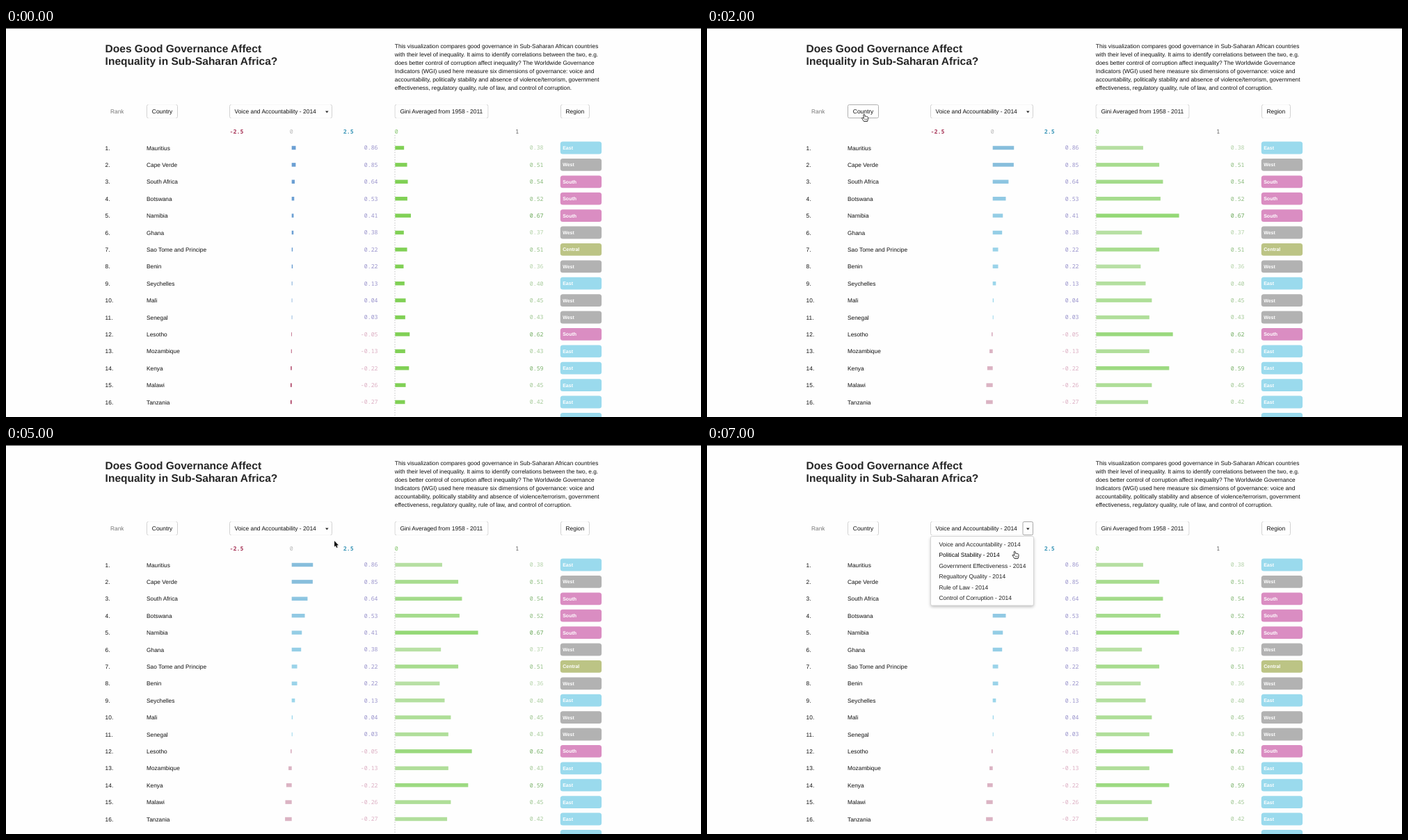
Write an HTML page with a canvas that moves like this. It is 999 px wide and 560 px high and loops after 8 s.

```html
<!DOCTYPE html>
<html lang="en">
<head>
<meta charset="utf-8">
<title>Governance and inequality</title>
<style>
html, body { margin: 0; width: 100%; height: 100%; overflow: hidden; background: #fefefe; }
canvas { display: block; width: 999px; height: 560px; }
</style>
</head>
<body>
<canvas id="stage" width="999" height="560"></canvas>
<script>
const ctx = document.getElementById('stage').getContext('2d');
const SANS = '"Liberation Sans", Arial, sans-serif';
const MONO = '"Noto Sans Mono", "DejaVu Sans Mono", monospace';
const LOOP = 8000, STEP = 1000;
const ROW_TOP = 172.5, ROW_GAP = 24.4, BAR_HEIGHT = 5.5;
const ZERO_X = 410.7, SCORE_SCALE = 35.5, GINI_X = 559.3, GINI_SCALE = 178;

const REGION_COLORS = { East: '#9adaed', West: '#b2b2b2', South: '#da8dc2', Central: '#bcc485' };

const ROWS = [
  ['Mauritius', 0.86, 0.38, 'East'],
  ['Cape Verde', 0.85, 0.51, 'West'],
  ['South Africa', 0.64, 0.54, 'South'],
  ['Botswana', 0.53, 0.52, 'South'],
  ['Namibia', 0.41, 0.67, 'South'],
  ['Ghana', 0.38, 0.37, 'West'],
  ['Sao Tome and Principe', 0.22, 0.51, 'Central'],
  ['Benin', 0.22, 0.36, 'West'],
  ['Seychelles', 0.13, 0.40, 'East'],
  ['Mali', 0.04, 0.45, 'West'],
  ['Senegal', 0.03, 0.43, 'West'],
  ['Lesotho', -0.05, 0.62, 'South'],
  ['Mozambique', -0.13, 0.43, 'East'],
  ['Kenya', -0.22, 0.59, 'East'],
  ['Malawi', -0.26, 0.45, 'East'],
  ['Tanzania', -0.27, 0.42, 'East']
];

const INTRO = [
  'This visualization compares good governance in Sub-Saharan African countries',
  'with their level of inequality. It aims to identify correlations between the two, e.g.',
  'does better control of corruption affect inequality? The Worldwide Governance',
  'Indicators (WGI) used here measure six dimensions of governance: voice and',
  'accountability, politically stability and absence of violence/terrorism, government',
  'effectiveness, regulatory quality, rule of law, and control of corruption.'
];

const MENU = ['Voice and Accountability', 'Political Stability', 'Government Effectiveness',
  'Regualtory Quality', 'Rule of Law', 'Control of Corruption'];

// One state per second: pointer shape and tip, hovered control, open menu
const STATES = [
  { growth: 0.19 },
  { pointer: 'arrow', x: 499, y: 79 },
  { pointer: 'hand', x: 226, y: 124, hover: 'country' },
  { pointer: 'hand', x: 397, y: 124, hover: 'score' },
  { pointer: 'hand', x: 622, y: 124, hover: 'gini' },
  { pointer: 'arrow', x: 472, y: 138 },
  { pointer: 'hand', x: 465.5, y: 123, menu: true, pressed: true },
  { pointer: 'hand', x: 442.5, y: 153, menu: true, item: 1 }
];

const mix = (a, b, t) => `rgb(${a.map((v, i) => Math.round(v + (b[i] - v) * t))})`;

function text(str, x, y, size, color = '#111', { font = SANS, weight = 400, align = 'left' } = {}) {
  ctx.font = `${weight} ${size}px ${font}`;
  ctx.textAlign = align;
  ctx.fillStyle = color;
  ctx.fillText(str, x, y);
}

function mono(str, x, y, color, weight = 400, align = 'left') {
  text(str, x, y, 8.3, color, { font: MONO, weight, align });
}

function rect(x, y, w, h, color) {
  ctx.fillStyle = color;
  ctx.fillRect(x, y, w, h);
}

function roundPath(x, y, w, h, r) {
  ctx.beginPath();
  ctx.roundRect(x, y, w, h, r);
}

function outline(x, w, color, fill = '#fefefe') {
  roundPath(x + 0.5, 110.5, w - 1, 19, 2);
  ctx.fillStyle = fill;
  ctx.fill();
  ctx.strokeStyle = color;
  ctx.stroke();
}

// Resting buttons show their sides, with nearly invisible top and bottom edges
function button(x, w, hover) {
  ctx.lineWidth = 1;
  if (hover) return outline(x, w, '#b0b0b0');
  outline(x, w, '#f7f7f7');
  ctx.save();
  ctx.beginPath();
  ctx.rect(x, 110, 2.5, 20);
  ctx.rect(x + w - 2.5, 110, 2.5, 20);
  ctx.clip();
  outline(x, w, '#d2d2d2');
  ctx.restore();
}

function drawHeader(state) {
  rect(0, 0, 999, 1, '#4a4a4a');
  const bold = { weight: 700 };
  text('Does Good Governance Affect', 142.6, 34.8, 15.52, '#262626', bold);
  text('Inequality in Sub-Saharan Africa?', 142.6, 52.7, 15.52, '#262626', bold);
  INTRO.forEach((line, i) => text(line, 558.8, 29.2 + i * 12, 8.32));

  text('Rank', 150, 123.3, 8.35, '#777');
  button(202, 45, state.hover === 'country');
  text('Country', 209.8, 123.3, 8.45);
  button(321, 148);
  if (state.hover === 'score') {
    outline(453, 16, '#d2d2d2');
    outline(321, 133, '#b0b0b0');
  }
  if (state.menu) outline(453.5, 15.5, '#a8a8a8', state.pressed ? '#d2d2d2' : '#fefefe');
  text('Voice and Accountability - 2014', 328.5, 123.3, 8.45);
  ctx.beginPath();
  ctx.moveTo(459, 119.6);
  ctx.lineTo(463.6, 119.6);
  ctx.lineTo(461.3, 122.2);
  ctx.fillStyle = '#222';
  ctx.fill();
  button(558.5, 135, state.hover === 'gini');
  text('Gini Averaged from 1958 - 2011', 566.4, 123.3, 8.45);
  button(797, 42);
  text('Region', 804.5, 123.3, 8.45);

  mono('-2.5', 321.5, 151.8, '#a8385a', 600);
  mono('0', 407.8, 151.8, '#b9b9b9');
  mono('2.5', 484.8, 151.8, '#3d97b8', 600);
  mono('0', 558.8, 151.8, '#83c46b', 500);
  mono('1', 732.2, 151.8, '#555');
}

function drawRow([name, score, gini, region], i, growth) {
  const y = ROW_TOP + i * ROW_GAP;
  const top = y - BAR_HEIGHT / 2;
  const early = growth < 1;
  text(`${i + 1}.`, 142.6, y + 3, 8.35);
  text(name, 202, y + 3, 8.35);

  const w = Math.max(Math.abs(score) * SCORE_SCALE * growth, 0.7);
  let color;
  if (score > 0) color = early ? '#6b9fd3' : mix([160, 218, 238], [135, 190, 220], score / 0.86);
  else color = early ? '#b0486a' : '#dbb3c3';
  rect(score > 0 ? ZERO_X : ZERO_X - w, top, w, BAR_HEIGHT, color);
  mono(score.toFixed(2), 534.6, y + 2.9, score > 0 ? '#9a94cc' : '#dcafc3', 400, 'right');

  const rank = (gini - 0.36) / 0.31;
  const green = early ? '#80d055' : mix([184, 224, 165], [148, 216, 118], rank);
  rect(GINI_X, top, gini * GINI_SCALE * growth, BAR_HEIGHT, green);
  mono(gini.toFixed(2), 772.6, y + 2.9, mix([182, 212, 171], [105, 168, 88], rank), rank > 0.7 ? 500 : 400, 'right');
  drawRegion(region, y);
}

function drawRegion(region, y) {
  roundPath(796.8, y - 8.9, 59.3, 17.8, 3.5);
  ctx.fillStyle = REGION_COLORS[region];
  ctx.fill();
  text(region, 800.2, y + 2.5, 7, '#fff', { weight: 700 });
}

function drawMenu(hovered) {
  ctx.save();
  ctx.shadowColor = 'rgba(0,0,0,.28)';
  ctx.shadowBlur = 4;
  ctx.shadowOffsetY = 2;
  roundPath(321.5, 131.5, 148, 99.5, 2);
  ctx.fillStyle = '#fefefe';
  ctx.fill();
  ctx.restore();
  ctx.strokeStyle = '#d6d6d6';
  ctx.stroke();
  MENU.forEach((label, i) =>
    text(`${label} - 2014`, 333.4, 146 + i * 15.45, 8.45, i === hovered ? '#000' : '#222'));
}

function polygon(points) {
  ctx.beginPath();
  points.forEach(([x, y]) => ctx.lineTo(x, y));
  ctx.closePath();
}

function drawPointer({ pointer, x, y }) {
  ctx.save();
  ctx.translate(x, y);
  ctx.lineJoin = 'round';
  if (pointer === 'arrow') {
    polygon([[0, 0], [0, 8.6], [1.9, 6.9], [3.2, 9.9], [4.7, 9.2], [3.4, 6.4], [6, 6.2]]);
    ctx.lineWidth = 1.4;
    ctx.strokeStyle = '#fff';
    ctx.stroke();
    ctx.fillStyle = '#111';
    ctx.fill();
  } else {
    polygon([[-1.2, 0.6], [-0.3, 0], [0.7, 0.7], [1.2, 3.4], [2.4, 3], [3.4, 3.6], [4.6, 3.5],
      [5.4, 4.6], [5.5, 7.2], [4.5, 10.5], [-0.5, 10.5], [-2.2, 7.8], [-3.6, 5.6], [-2.7, 5], [-0.6, 6.2]]);
    ctx.fillStyle = '#fff';
    ctx.fill();
    ctx.lineWidth = 0.9;
    ctx.strokeStyle = '#222';
    ctx.stroke();
    ctx.beginPath();
    for (const fx of [0.8, 2.2, 3.6]) {
      ctx.moveTo(fx, 6.5);
      ctx.lineTo(fx, 8.8);
    }
    ctx.lineWidth = 0.5;
    ctx.stroke();
  }
  ctx.restore();
}

function draw(time) {
  const state = STATES[Math.floor((time % LOOP) / STEP)];
  ctx.textRendering = 'geometricPrecision';
  rect(0, 0, 999, 560, '#fefefe');
  drawHeader(state);
  for (let y = 154; y < 560; y += 3.5) rect(558.5, y, 1, 1.5, '#c4c4c4');
  ROWS.forEach((row, i) => drawRow(row, i, state.growth ?? 1));
  drawRegion('East', ROW_TOP + ROWS.length * ROW_GAP);
  if (state.menu) drawMenu(state.item);
  if (state.pointer) drawPointer(state);
}

let start;
function tick(now) {
  start ??= now;
  draw(now - start);
  requestAnimationFrame(tick);
}
draw(0);
requestAnimationFrame(tick);
</script>
</body>
</html>
```
